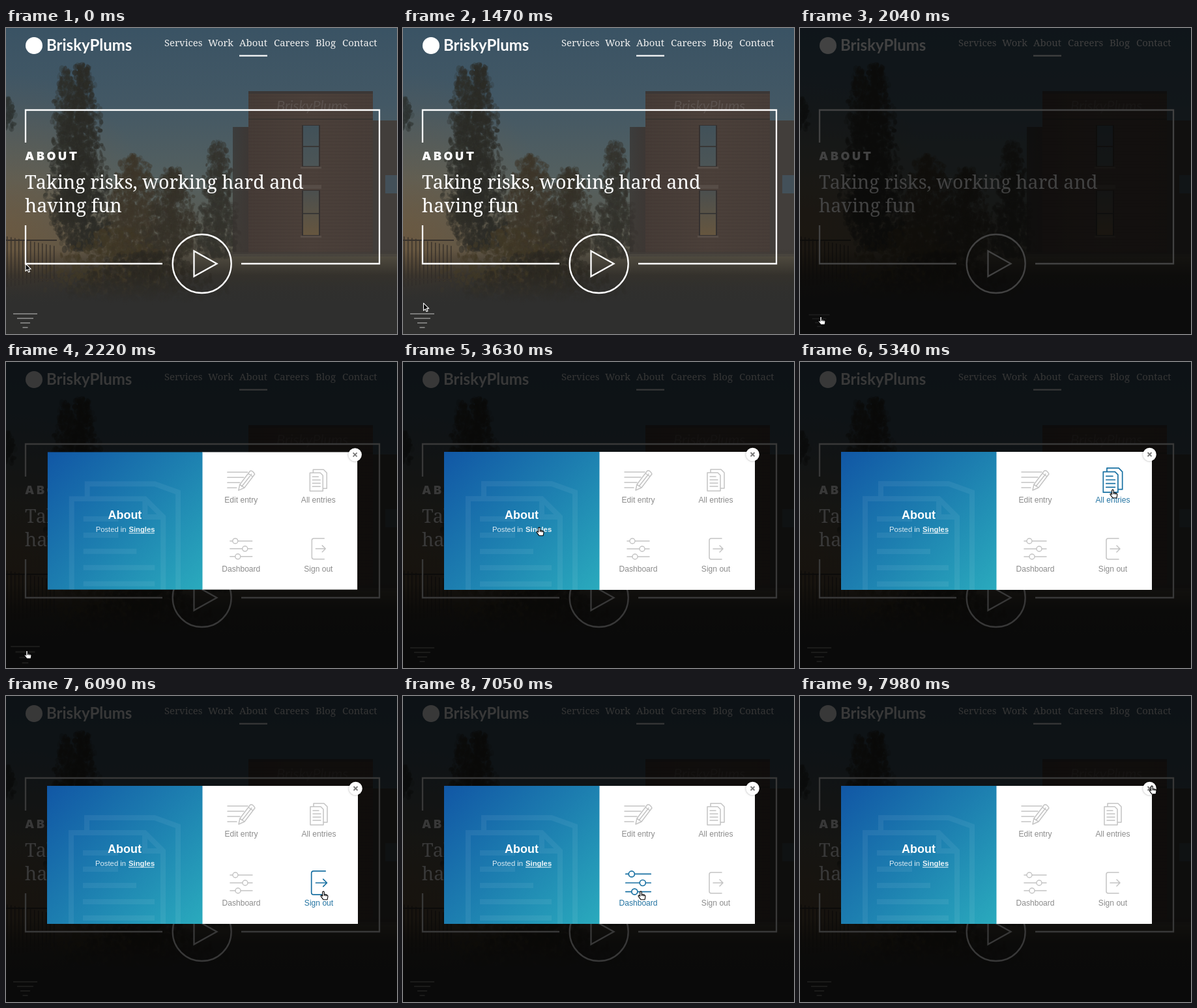
These frames come from a looping animation (600x470 px, 8000 ms). An HTML page with a canvas:

```html
<!DOCTYPE html>
<html lang="en">
<head>
<meta charset="utf-8">
<title>About</title>
<style>
html, body { margin: 0; width: 100%; height: 100%; overflow: hidden; background: #2f2f2e; }
canvas { display: block; width: 100vw; height: 100vh; }
</style>
</head>
<body>
<canvas id="stage" width="600" height="470"></canvas>
<script>
const W = 600, H = 470, LOOP = 8000;
const SLAB = '"Noto Serif", serif', SANS = '"Liberation Sans", Arial, sans-serif';
const BRAND = 'BriskyPlums';
const ctx = document.getElementById('stage').getContext('2d');

const clamp = v => Math.max(0, Math.min(1, v));
const mix = (a, b, p) => a + (b - a) * p;
const smooth = p => p * p * (3 - 2 * p);
const easeOut = p => 1 - (1 - p) * (1 - p);
const progress = (t, start, length) => clamp((t - start) / length);

// Interpolates rows of [time, ...values], easing in and out of each row.
function track(rows, t) {
  const i = rows.findIndex(row => row[0] > t);
  if (i === 0) return rows[0].slice(1);
  if (i < 0) return rows[rows.length - 1].slice(1);
  const a = rows[i - 1], b = rows[i];
  const p = smooth((t - a[0]) / (b[0] - a[0]));
  return a.slice(1).map((v, k) => mix(v, b[k + 1], p));
}

function text(c, str, x, y, font, color, align = 'left') {
  c.font = font;
  c.fillStyle = color;
  c.textAlign = align;
  c.fillText(str, x, y);
}

function gradient(c, box, ...colors) {
  const g = c.createLinearGradient(...box);
  colors.forEach((color, i) => g.addColorStop(i / (colors.length - 1), color));
  return g;
}

function paintPhoto() {
  const canvas = document.createElement('canvas');
  canvas.width = W;
  canvas.height = H;
  const c = canvas.getContext('2d');
  let seed = 11;
  const random = () => (seed = (seed * 16807) % 2147483647) / 2147483647;
  const rect = (color, x, y, w, h) => { c.fillStyle = color; c.fillRect(x, y, w, h); };
  const glow = (x, y, r, rgb, alpha) => {
    const g = c.createRadialGradient(x, y, 0, x, y, r);
    g.addColorStop(0, `rgba(${rgb},${alpha})`);
    g.addColorStop(1, `rgba(${rgb},0)`);
    rect(g, 0, 0, W, H);
  };
  // A crown of small leaves, widening downwards and closing at its foot.
  const foliage = (x, top, bottom, half, rgb, count) => {
    for (let i = 0; i < count; i++) {
      const v = Math.pow(random(), .75);
      const spread = half * (.12 + .88 * Math.sqrt(v)) * Math.min(1, (1.15 - v) * 4);
      const px = x + (random() + random() - 1) * spread, py = mix(top, bottom, v);
      c.fillStyle = `rgba(${rgb},${.2 + random() * .4})`;
      c.beginPath();
      c.ellipse(px, py, 1.5 + random() * 3, 2 + random() * 4, random() - .5, 0, 7);
      c.fill();
    }
  };

  rect(gradient(c, [0, 0, 0, 350], '#3a5364', '#435865', '#55605f', '#5a5548'), 0, 0, W, H);
  glow(0, 300, 230, '118,92,62', .55);
  foliage(2, 108, 155, 20, '46,51,49', 90);

  foliage(196, 195, 350, 62, '61,54,42', 1100);
  foliage(255, 215, 350, 55, '54,50,41', 900);
  foliage(325, 175, 352, 40, '52,51,45', 800);
  foliage(92, 62, 300, 38, '46,47,42', 900);
  foliage(117, 56, 340, 52, '44,44,39', 1900);

  rect('#423e3b', 563, 142, 37, 205);
  rect('#435059', 582, 226, 18, 28);
  rect(gradient(c, [346, 0, 374, 0], 'rgba(54,49,46,.7)', '#3d3734'), 348, 152, 26, 195);
  rect(gradient(c, [372, 0, 563, 0], '#453b36', '#4b403a', '#473d38'), 372, 97, 191, 250);
  rect('#3b3736', 372, 97, 191, 4);
  for (let y = 104; y < 345; y += 5) rect('rgba(25,20,18,.08)', 372, y, 191, 1);
  rect('#3b3531', 372, 139, 191, 2);
  text(c, BRAND, 415, 127, 'italic 22px Lato, sans-serif', '#5a514d');
  for (const [y, h] of [[150, 62], [250, 68]]) {
    const low = y > 200;
    rect('#353130', 454, y - 1, 28, h + 2);
    rect(gradient(c, [0, y, 0, y + h], low ? '#4b4f4e' : '#415159', low ? '#66563f' : '#4c5556'), 456, y, 24, h);
    rect('#393836', 456, y + h / 2, 24, 2);
    rect('#574d47', 452, y + h + 1, 32, 3);
  }
  rect('#564c46', 452, 241, 32, 6);

  rect(gradient(c, [0, 340, 0, 420], 'rgba(49,45,38,0)', '#34312c', '#2f2f2e'), 0, 340, W, 130);
  rect('rgba(66,62,59,.55)', 340, 344, 260, 7);
  foliage(165, 305, 410, 130, '64,56,38', 700);
  foliage(215, 345, 420, 150, '44,41,34', 900);
  glow(10, 330, 120, '112,82,48', .2);
  for (let x = 1; x < 78; x += 6) rect('rgba(48,43,39,.8)', x, 320 + x * .2, 1.5, 78 - x * .35);
  rect('#38322c', 0, 325, 78, 2);
  rect('#38322c', 0, 385, 78, 2);
  rect(gradient(c, [0, 380, 0, H], 'rgba(47,47,46,0)', '#2f2f2e', '#2f2f2e'), 0, 380, W, 90);
  return canvas;
}

const photo = paintPhoto();

const framePath = new Path2D(
  'M30 176V126H573V362H361M240 362H30V303M345.7 362a45 45 0 1 1-90 0a45 45 0 1 1 90 0' +
  'M288.5 342.5V381.5L323.5 362Z');
const menuLines = new Path2D('M-18.5-10H18.5M-12.5-3H12.5M-7.5 4H7.5M-4 11H4');
const ghostPages = new Path2D(
  'M124 206V187H228L264 200V352M100 352V210H213L241 238V352' +
  'M213 210V238H241M118 241H172M118 266H172M118 291H200M118 316H228M118 341H228');
const arrow = new Path2D('M0 0V11.5L2.7 9L4.6 13L6.5 12.2L4.7 8.3H8.3Z');
const hand = new Path2D(
  'M-1.3 1Q0-.8 1.3 1V4.5L5.4 5.4Q7.2 6 7 8L6 12.8H0L-3.5 8.2Q-4.6 6.3-3 6L-1.3 7.4Z');

const items = [
  { label: 'Edit entry', x: 361, y: 181, icon: new Path2D(
    'M-21-12H10M-21-4H4M-21 4H-2M-21 12H-7M-4 16L-2 7L14-14Q18-15 21-9L5 12Z' +
    'M-2 7L5 12M11-10L18-5M1 10L16-9') },
  { label: 'All entries', x: 480, y: 181, icon: new Path2D(
    'M-8-11V-16H8L13-11V13H7M-13-11H3L7-7V17H-13ZM-9-5H0M-9 0H3M-9 5H3M-9 10H3') },
  { label: 'Dashboard', x: 361, y: 287, icon: new Path2D(
    'M-17-12H-13M-5-12H17M-17 0H2M10 0H17M-17 12H-9M-1 12H17' +
    'M-5-12a4 4 0 1 1-8 0a4 4 0 1 1 8 0M10 0a4 4 0 1 1-8 0a4 4 0 1 1 8 0' +
    'M-1 12a4 4 0 1 1-8 0a4 4 0 1 1 8 0') },
  { label: 'Sign out', x: 480, y: 287, icon: new Path2D(
    'M9-16H-7Q-10-16-10-13V13Q-10 16-7 16H9M-4 0H11M6-5L11 0L6 5') }
];

const cursorRows = [
  [0, 30, 362], [880, 30, 362], [1760, 32, 443], [2250, 32, 443], [2430, 45, 441],
  [3180, 209, 254], [3850, 209, 254], [4520, 330, 206], [4780, 338, 203],
  [5350, 480, 196], [5560, 482, 198], [6050, 487, 300], [6300, 487, 300],
  [6800, 365, 300], [7050, 365, 300], [7750, 540, 138], [LOOP, 540, 138]
];
const menuRows = [[1850, 1], [2040, .86], [2220, 1.2], [2400, 1]];

const cursorAt = t => track(cursorRows, Math.max(0, t));
const inside = ([x, y], l, t, r, b) => x >= l && x <= r && y >= t && y <= b;
const overItem = (pos, { x, y }) => inside(pos, x - 46, y - 24, x + 46, y + 40);
const overSingles = pos => inside(pos, 187, 247, 229, 265);

// Fraction of the last 150 ms spent over an item, used as its fade.
function hoverAmount(item, t) {
  let hits = 0;
  for (let k = 0; k < 10; k++) hits += overItem(cursorAt(t - k * 15), item);
  return hits / 10;
}

function drawPage(t) {
  ctx.drawImage(photo, 0, 0);
  ctx.fillStyle = '#fff';
  ctx.beginPath();
  ctx.arc(43, 27, 13, 0, 7);
  ctx.fill();
  text(ctx, BRAND, 62, 35, 'bold 24px Lato, sans-serif', '#fff');

  const nav = [['Services', 243], ['Work', 310], ['About', 358], ['Careers', 411], ['Blog', 475], ['Contact', 516]];
  for (const [label, x] of nav) text(ctx, label, x, 28, `300 14.9px ${SLAB}`, '#f0f0f0');
  ctx.fillStyle = '#fff';
  ctx.fillRect(358, 41.5, 43, 2.2);

  ctx.strokeStyle = '#fff';
  ctx.lineWidth = 2.3;
  ctx.stroke(framePath);
  ctx.letterSpacing = '3.6px';
  text(ctx, 'ABOUT', 29, 203, '900 18px Inter, sans-serif', '#fff');
  ctx.letterSpacing = '0px';
  text(ctx, 'Taking risks, working hard and', 29, 247, `300 28.7px ${SLAB}`, '#fff');
  text(ctx, 'having fun', 29, 283, `300 28.7px ${SLAB}`, '#fff');

  const [scale] = track(menuRows, t);
  ctx.save();
  ctx.translate(29.5, 449);
  ctx.scale(scale, scale);
  ctx.lineWidth = 1.8;
  ctx.strokeStyle = 'rgba(255,255,255,.36)';
  ctx.stroke(menuLines);
  ctx.restore();
}

function drawItem(item, t) {
  const h = hoverAmount(item, t), scale = 1 + .13 * h;
  const shade = (from, to) => `rgb(${to.map(v => Math.round(mix(from, v, h)))})`;
  ctx.save();
  ctx.translate(item.x, item.y);
  ctx.scale(scale, scale);
  ctx.lineWidth = 1.5;
  ctx.lineCap = ctx.lineJoin = 'round';
  ctx.strokeStyle = shade(196, [24, 112, 162]);
  ctx.stroke(item.icon);
  ctx.restore();
  text(ctx, item.label, item.x, item.y + 35, `12.1px ${SANS}`, shade(140, [36, 116, 162]), 'center');
}

function drawModal(t) {
  const p = progress(t, 2060, 200);
  if (!p) return;
  const scale = mix(.9, 1, easeOut(p));
  ctx.save();
  ctx.globalAlpha = clamp(p * 1.4);
  ctx.translate(301.5, 244);
  ctx.scale(scale, scale);
  ctx.translate(-301.5, -244);

  ctx.fillStyle = '#fff';
  ctx.fillRect(301, 138, 239, 212);
  ctx.fillStyle = gradient(ctx, [70, 132, 294, 356], '#1157a5', '#1d7fb0', '#2aaabd');
  ctx.fillRect(63, 138, 238.5, 212);
  ctx.save();
  ctx.beginPath();
  ctx.rect(63, 138, 238, 212);
  ctx.clip();
  ctx.lineWidth = 8;
  ctx.strokeStyle = 'rgba(255,255,255,.06)';
  ctx.stroke(ghostPages);
  ctx.restore();

  text(ctx, 'About', 182, 240.5, `bold 18px ${SANS}`, '#fff', 'center');
  text(ctx, 'Posted in', 137, 261, `11.3px ${SANS}`, 'rgba(255,255,255,.85)');
  text(ctx, 'Singles', 188, 261, `bold 11.3px ${SANS}`, 'rgba(255,255,255,.92)');
  if (!overSingles(cursorAt(t))) ctx.fillRect(188, 262.5, 39.5, 1);
  for (const item of items) drawItem(item, t);

  ctx.shadowColor = 'rgba(0,0,0,.35)';
  ctx.shadowBlur = 3;
  ctx.fillStyle = '#fff';
  ctx.beginPath();
  ctx.arc(536.5, 142, 10.3, 0, 7);
  ctx.fill();
  ctx.shadowBlur = 0;
  ctx.strokeStyle = '#777';
  ctx.lineWidth = 1.8;
  ctx.stroke(new Path2D('M533.5 139l6 6M539.5 139l-6 6'));
  ctx.restore();
}

function drawCursor(t) {
  const pos = cursorAt(t);
  const overLink = t < 2300
    ? inside(pos, 11, 436, 48, 463)
    : overSingles(pos) || items.some(item => overItem(pos, item)) || inside(pos, 526, 132, 547, 153);
  ctx.save();
  ctx.translate(...pos);
  ctx.lineWidth = 1.1;
  ctx.lineJoin = 'round';
  ctx.fillStyle = overLink ? '#fff' : '#000';
  ctx.strokeStyle = overLink ? '#000' : '#fff';
  const shape = overLink ? hand : arrow;
  ctx.fill(shape);
  ctx.stroke(shape);
  if (overLink) ctx.stroke(new Path2D('M1.3 4.5V7M3.2 5.2V7.2M5 5.6V7.4'));
  ctx.restore();
}

function draw(t) {
  drawPage(t);
  ctx.fillStyle = `rgba(0,0,0,${.78 * easeOut(progress(t, 1830, 270))})`;
  ctx.fillRect(0, 0, W, H);
  drawModal(t);
  drawCursor(t);
}

const start = performance.now();
function tick() {
  draw((performance.now() - start) % LOOP);
  requestAnimationFrame(tick);
}
tick();
</script>
</body>
</html>
```
